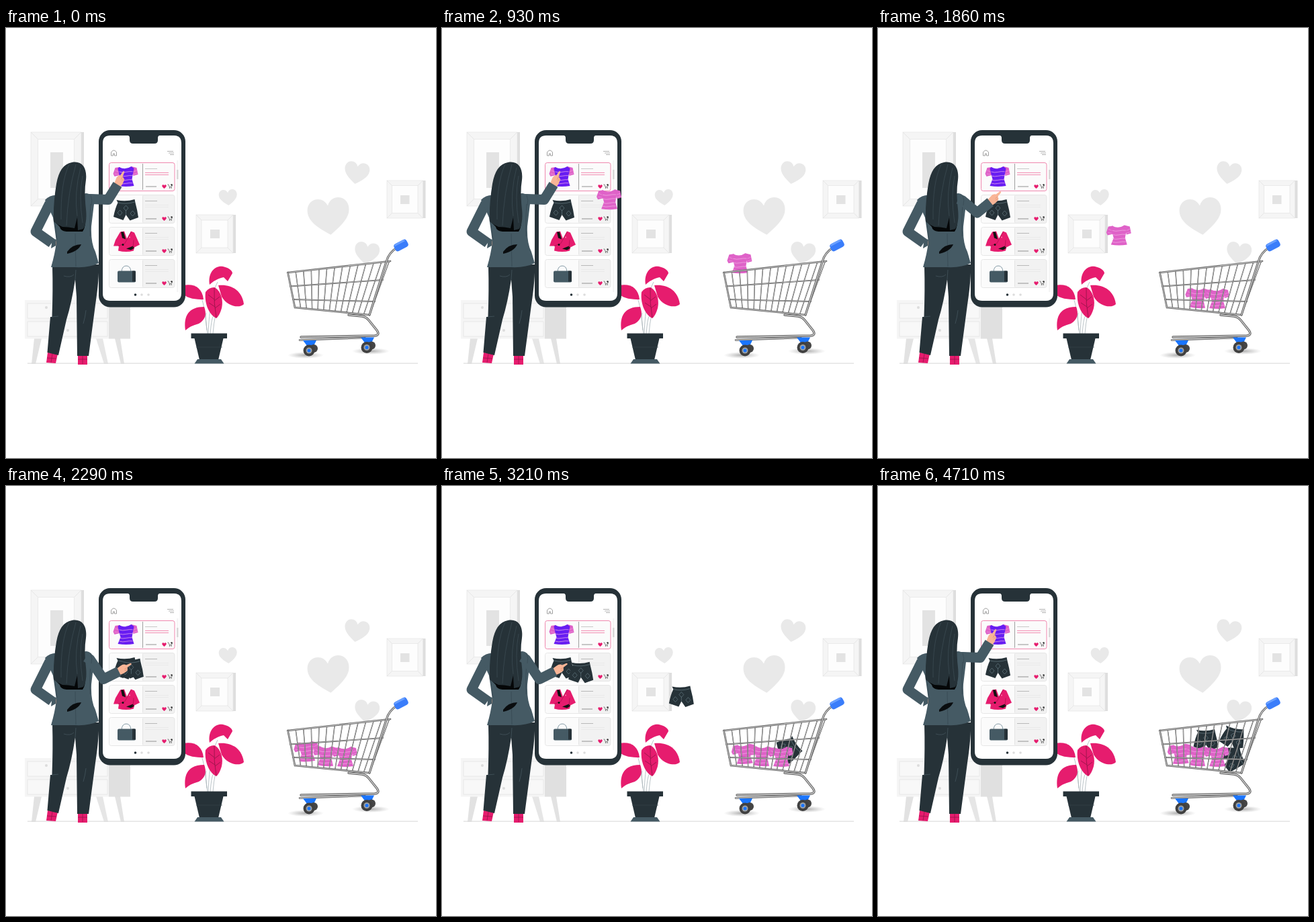
Recreate the animation shown at these times as an HTML page. Size 640 by 640 pixels, loop 6 s.

```html
<!DOCTYPE html>
<html lang="en">
<head>
<meta charset="utf-8">
<title>Shopping</title>
<style>
html, body { margin: 0; width: 100%; height: 100%; overflow: hidden; background: #fff; }
svg { display: block; width: 100%; height: 100%; }
</style>
</head>
<body>
<svg id="stage" viewBox="0 0 640 640"></svg>
<script>
const DARK = '#263238', SLATE = '#455a64', PINK = '#e61c6e', ORCHID = '#df62c8', SKIN = '#f9b596', BLUE = '#1a75ff';

const path = (d, fill, extra = '') => `<path d="${d}" fill="${fill}" ${extra}/>`;
const line = (d, color, w = 1, extra = '') =>
  `<path d="${d}" fill="none" stroke="${color}" stroke-width="${w}" ${extra}/>`;
const rect = (x, y, w, h, fill, extra = '') =>
  `<rect x="${x}" y="${y}" width="${w}" height="${h}" fill="${fill}" ${extra}/>`;
const dot = (x, y, r, fill, extra = '') => `<circle cx="${x}" cy="${y}" r="${r}" fill="${fill}" ${extra}/>`;
const at = (x, y, body, extra = '') => `<g transform="translate(${x} ${y}) ${extra}">${body}</g>`;

// Heart in a box of about 2 x 1.8 units
const heart = (x, y, s, turn, fill) =>
  at(x, y, path('M0 .9C-.5 .55-1 .2-1-.3C-1-.95-.2-1.05 0-.5C.2-1.05 1-.95 1-.3C1 .2.5 .55 0 .9Z', fill),
    `rotate(${turn}) scale(${s})`);

function shirt(body) {
  const stripes = [-7, -1, 5, 10].map(y => `M-10 ${y}q5 1.6 10 .4t10-.6`).join('');
  return path('M-9-14L-16-13L-19-4L-17 0L-9-2ZM8-15L16-13L18-3L11-1Z', ORCHID)
    + path('M-10-14Q-1-9 8-15L12-12L10-2L9 4L12 14Q0 16-12 14L-8 4L-10-3L-12-12Z', body)
    + line(stripes, '#f3b3e6', .7) + line('M-16-9l5 2M-17-4l6 1M16-9l-5 2M17-5l-6 2', '#f3b3e6', .5);
}

const diamond = (x, y) => `M${x} ${y - 4}l3.5 4l-3.5 4l-3.5-4Z`;
const shorts = path('M-14-15Q0-12 13-16L14-11Q17 0 18.5 11L6 15.5L0 7L-4 15L-18.5 10Q-16-3-12-11Z', DARK)
  + line(diamond(-9, 4) + diamond(0, -3) + diamond(10, 5) + 'M-12-11Q0-8 13-12M0 0V7', '#6f858e', .6);

const blouse = path('M-9-14L-3-15L1-4L7-15L12-13L20 5L12 9L11 14Q0 17-12 14L-11 7L-19 7L-16-2Z', PINK)
  + path('M-8-14L-4-14L-1-3L-6-5ZM0 11L10 7L12 10L7 13Z', '#111')
  + line('M7-14L-2 3L-12 7M11-2L10 10', '#a70f4b', .7) + dot(-5, 5, 1.5, '#111') + dot(5, -6, 1, '#ff77ab');

const bag = line('M-7-6Q-6-14 0-14Q6-14 7-6', '#78909c', .9)
  + rect(-13, -6.5, 27, 17, SLATE, 'rx="2"') + path('M9-6.5h4q1 0 1 1v15h-5Z', DARK);

function picture(x, y, w, h, inset, sq) {
  const [ix, iy, iw, ih] = [x + inset, y + inset, w - inset * 2 - 4, h - inset * 2];
  const [r, b] = [x + w - 4, y + h];
  return rect(x, y, w, h, '#dedede') + rect(x, y, w - 4, h, '#f5f5f5', 'stroke="#e6e6e6" stroke-width=".7"')
    + line(`M${x} ${y}L${ix} ${iy}M${r} ${y}L${ix + iw} ${iy}M${x} ${b}L${ix} ${iy + ih}M${r} ${b}L${ix + iw} ${iy + ih}`, '#e0e0e0', .7)
    + rect(ix, iy, iw, ih, '#fdfdfd', 'stroke="#e6e6e6" stroke-width=".8"') + rect(...sq, '#e3e3e3');
}

function room() {
  return picture(37, 155, 79, 110, 10.5, [66, 185, 19, 53])
    + picture(283, 278, 59, 57, 8, [304, 300, 14, 13])
    + picture(567, 227, 57.5, 56, 7.5, [587, 249, 13.5, 13])
    + heart(330.5, 252, 13.5, -4, '#e9e9e9') + heart(480.5, 280, 31, -6, '#e9e9e9')
    + heart(522, 215.5, 18.5, 9, '#e9e9e9') + heart(537, 335, 18.5, 8, '#e9e9e9')
    + path('M42 462h11l-9 38h-6ZM162 462h8l6 38h-5Z', '#e2e2e2') + path('M134 462h10l8 38h-6Z', '#e6e6e6')
    + rect(153, 405, 32, 57.5, '#e0e0e0') + rect(28, 405, 125, 57.5, '#f5f5f5')
    + [410, 437].map(y => rect(32, y, 119, 22, '#f8f8f8', 'stroke="#e4e4e4" stroke-width=".8"')).join('')
    + dot(60, 416, 2, '#dcdcdc') + dot(92, 450, 2, '#dcdcdc')
    + line('M32 499.2H613', '#dedede', 1.3);
}

function plant() {
  return line('M300 455Q296 430 298 424M304 455Q306 430 309 428M308 455Q310 425 320 400M301 455Q303 400 315 378M299 450Q296 415 291 402', '#a9b4b9', .8)
    + path('M303 382C300 363 312 353 323 355C333 357 337 362 337 365L330 377L324 371C315 373 308 377 303 382Z', PINK)
    + path('M264 383C281 380 292 387 294 404C283 404 270 403 264 396Z', PINK)
    + path('M316 383C335 381 351 390 354 411C347 418 329 414 321 400Z', PINK)
    + path('M267 450C264 428 272 415 295 415C299 426 297 434 287 440C281 442 275 443 267 450Z', PINK)
    + path('M310 386C319 390 324 404 321 417Q318 428 313 432C301 426 295 408 297 393Q302 386 310 386Z', PINK)
    + line('M310 387Q309 410 313 431M310 404l-9-7M310 406l8-6M311 415l-9-6M311 417l8-6', '#8f1346', .8)
    + path('M280 460h44l-8 34h-28Z', DARK) + rect(275.5, 454.5, 53.5, 7.5, DARK)
    + line('M283 475H322', '#37474f', .6) + path('M285 493h35l4.5 6.5h-44Z', SLATE);
}

function card(y, item, active) {
  const ink = active ? '#f28bb1' : '#dedede';
  const box = rect(153.5, y + .5, 97.5, 42, '#fbfbfb', 'rx="3"')
    + (active ? '' : path(`M203 ${y + .5}h45q3 0 3 3v36q0 3-3 3h-45Z`, '#f2f2f2'))
    + rect(153.5, y + .5, 97.5, 42, 'none', `rx="3" stroke="${active ? '#ee7ba6' : '#e4e4e4'}" stroke-width=".9"`);
  return box + line(`M203.5 ${y + 2}V${y + 41}`, active ? '#777' : '#e0e0e0', .7)
    + line(`M207 ${y + 9.5}h18`, active ? '#bbb' : '#aaa', .8)
    + line(`M207 ${y + 15.5}h35M207 ${y + 18.5}h35`, ink, active ? 1 : .5)
    + line(`M208 ${y + 36}h16`, '#777', .8)
    + heart(235.5, y + 36, 3.2, 0, PINK)
    + line(`M240.500 ${y + 33}h1.500l1 3.500h3.500l1-3`, '#555', .7)
    + dot(243.5, y + 38, .7, '#333') + dot(246, y + 38, .7, '#333') + dot(246.5, y + 33.5, 1.3, '#333')
    + item;
}

function phone() {
  return rect(138, 152, 129, 263.5, DARK, 'rx="17"')
    + path('M155 160H181Q184 160 184 164V167Q184 172 189 172H221Q226 172 226 167V164Q226 160 229 160H250Q261 160 261 171V395Q261 406 250 406H155Q144 406 144 395V171Q144 160 155 160Z', '#fff')
    + line('M156.500 190V185Q160.500 179 164.500 185V190H161.500V187H159.500V190Z', '#888', .8)
    + line('M240 183.500h9M242 186h8M244 188.500h6', '#aaa', .9)
    + rect(254, 197, 2.5, 196, '#f5f5f5') + rect(254, 211, 2.5, 14, '#d8d8d8')
    + card(200, at(178.5, 221, shirt('#681df2')), true)
    + card(248, at(178.5, 271, shorts))
    + card(296, at(179, 317.5, blouse))
    + card(344, at(179, 368, bag))
    + dot(192.5, 397, 1.8, DARK) + dot(202, 397, 1.8, '#dcdcdc') + dot(212, 397, 1.8, '#dcdcdc');
}

function woman() {
  const shoes = path('M62 483L77 485L74 499L60 498Z', PINK) + path('M107 486H121L121 501H107Z', PINK)
    + line('M69 485L67 498M61 491l14 1M114 487V500M107 493h14', '#8f1346', .7);
  const legs = path('M70 352H138Q139 372 133 412L123 488H106L105 400L103 374Q98 408 90 434L78 487L61.500 483L66 430H68.500Q70 390 69 355Z', DARK)
    + line('M104 360L103 374M68 430l10-1M86 369Q96 372 101 367M119 420Q118 430 115 440', '#4d6069', .6);
  const hip = line('M65 261L44 303L68 320', SLATE, 15, 'stroke-linejoin="round"')
    + path('M72 317Q80 314 88 319L82 321L85 325L75 327Z', SKIN) + path('M69 313l6 2l-1 9l-7 4Z', SLATE);
  const coat = path('M58 256Q68 246 82 250L120 246Q130 247 131 262L127 295Q126 320 133 333L138 350Q124 357 103 356H67Q73 336 75 318Q72 295 70 282Z', SLATE)
    + line('M71 280Q74 300 76 315M103 306L104 355M126 262Q124 290 125 310', '#34464f', .7)
    + path('M91 333Q99 322 112 322Q108 332 91 336Z', '#0a0d0f');
  const hair = path('M72 288Q83 296 94 289L103 278L118 280Q119 297 114 303L90 303Q81 302 80 296Z', '#050708')
    + path('M98 200C113 197 121 208 119 226Q116 244 119 270Q121 290 115 299L107 301L106 282L102 298Q93 296 84 296Q77 293 71 288Q70 262 75 232Q80 203 98 200Z', DARK)
    + line('M94 203Q81 230 82 285M104 203Q92 245 90 294M111 208Q101 246 106 280M114 220Q108 250 114 290', '#42535b', .6);
  return shoes + legs + hip + coat + hair;
}

// Metal tube: dark outline with a light core
const tube = (d, w) => line(d, '#585858', w, 'stroke-linecap="round"')
  + line(d, '#d0d0d0', w * .4, 'stroke-linecap="round"');

function wheel(x, y) {
  return path(`M${x - 9} ${y - 15}h20l-4 8l-7 9h-4l1-9Z`, BLUE) + dot(x + 7, y - 3, 6, '#454545')
    + dot(x, y, 8.5, '#404040') + dot(x, y, 4.5, '#9aa0a6') + dot(x, y, 2.5, BLUE);
}

function cart() {
  let wires = '';
  for (let i = 0; i <= 13; i++) {
    const t = i / 13;
    wires += `M${419.5 + 151 * t} ${364 - 17 * t}L${430 + 111 * t} ${416 + 11 * t}`;
  }
  return tube(wires, 1.5)
    + tube('M423 384.500L561 375M427 404L549 407', 1.8)
    + tube('M419.500 364L572 347', 2.6) + tube('M419.500 364L430 416L541 427', 2.6)
    + tube('M541 427L566 348Q569 335 583 326', 3.2)
    + tube('M510 427L530 429Q536 430 540 435L552 450Q557 457 549 458L439 460', 3.4)
    + tube('M437 464.500L534 461', 2.6)
    + wheel(451, 480) + wheel(537, 475.5)
    + at(588, 323.500, rect(-10.500, -6, 21, 12, '#3a7dfa', 'rx="4"') + path('M-10-3l3-3h14l2 3Z', '#6aa0ff'), 'rotate(-28)');
}

const shadow = ['446 487 27 5', '543 481 28 5'].map(s => {
  const [x, y, rx, ry] = s.split(' ');
  return `<ellipse cx="${x}" cy="${y}" rx="${rx}" ry="${ry}" fill="url(#soft)"/>`;
}).join('');

// Flying goods: begin and span in steps of 1/14 s, resting place, turn
const SHIRT = { from: [178.5, 221], slope: .485, span: 18, art: shirt(ORCHID) };
const SHORTS = { from: [179, 271], slope: .24, span: 16.2, art: shorts };
const goods = [
  { ...SHORTS, begin: 42.2, to: [528, 374.5], turn: 14 },
  { ...SHORTS, begin: 36.1, to: [488, 378], turn: 0 },
  { ...SHORTS, begin: 30.6, to: [528, 405], turn: 72 },
  { ...SHIRT, begin: 15, to: [450, 399], turn: -3 },
  { ...SHIRT, begin: 7.3, to: [476, 402], turn: 4 },
  { ...SHIRT, begin: 0, to: [505, 403], turn: 0 },
];

const stage = document.getElementById('stage');
stage.innerHTML = `<defs><radialGradient id="soft"><stop offset="0" stop-color="#777" stop-opacity=".6"/>
<stop offset="1" stop-color="#999" stop-opacity="0"/></radialGradient></defs>`
  + room() + plant() + phone() + shadow
  + goods.map(g => `<g class="item">${g.art}</g>`).join('')
  + cart() + woman()
  + `<g id="hand">${path('M-2-5L6-6Q12-7 14-3L21-2.500Q23-1 21 0L14 1L12 5Q5 7-2 5Z', SKIN)}${line('M14 1L9 1M12 4L8 3', '#d98b6d', .6)}</g>`
  + `<path id="sleeve" fill="none" stroke="${SLATE}" stroke-width="15" stroke-linejoin="round"/>`
  + line('M126 249Q129 256 127 264', '#34464f', .6);

const items = [...stage.querySelectorAll('.item')];
const hand = document.getElementById('hand');
const sleeve = document.getElementById('sleeve');

const clamp = v => Math.min(1, Math.max(0, v));
const mix = (a, b, t) => a + (b - a) * t;
const smooth = t => t * t * (3 - 2 * t);

function placeItem(el, g, step) {
  const u = smooth(clamp((step - g.begin) / g.span));
  const drop = clamp((u - .8) / .2) ** 1.2;
  const dx = g.to[0] - g.from[0], sink = g.to[1] - g.from[1] - dx * g.slope;
  const x = g.from[0] + dx * u, y = g.from[1] + dx * u * g.slope + sink * drop;
  el.setAttribute('transform', `translate(${x} ${y}) rotate(${g.turn * drop})`);
  el.setAttribute('visibility', step > g.begin ? 'visible' : 'hidden');
}

function placeArm(step) {
  const low = clamp((step - 16.7) / 15.3) - clamp((step - 47.7) / 18.3);
  const ex = mix(152, 145, low), ey = mix(255.5, 287.5, low);
  const wx = mix(166, 168, low), wy = mix(233, 276, low);
  sleeve.setAttribute('d', `M119 254.500L${mix(126, 125, low)} ${mix(254.5, 258, low)}L${ex} ${ey}L${wx} ${wy}`);
  hand.setAttribute('transform', `translate(${wx} ${wy}) rotate(${mix(-61, -29, low)})`);
}

function draw(ms) {
  const step = Math.min(66, Math.floor((ms + 5) * 14 / 1000));
  goods.forEach((g, i) => placeItem(items[i], g, step));
  placeArm(step);
}

const start = performance.now();
function tick() {
  draw((performance.now() - start) % 6000);
  requestAnimationFrame(tick);
}
tick();
</script>
</body>
</html>
```
